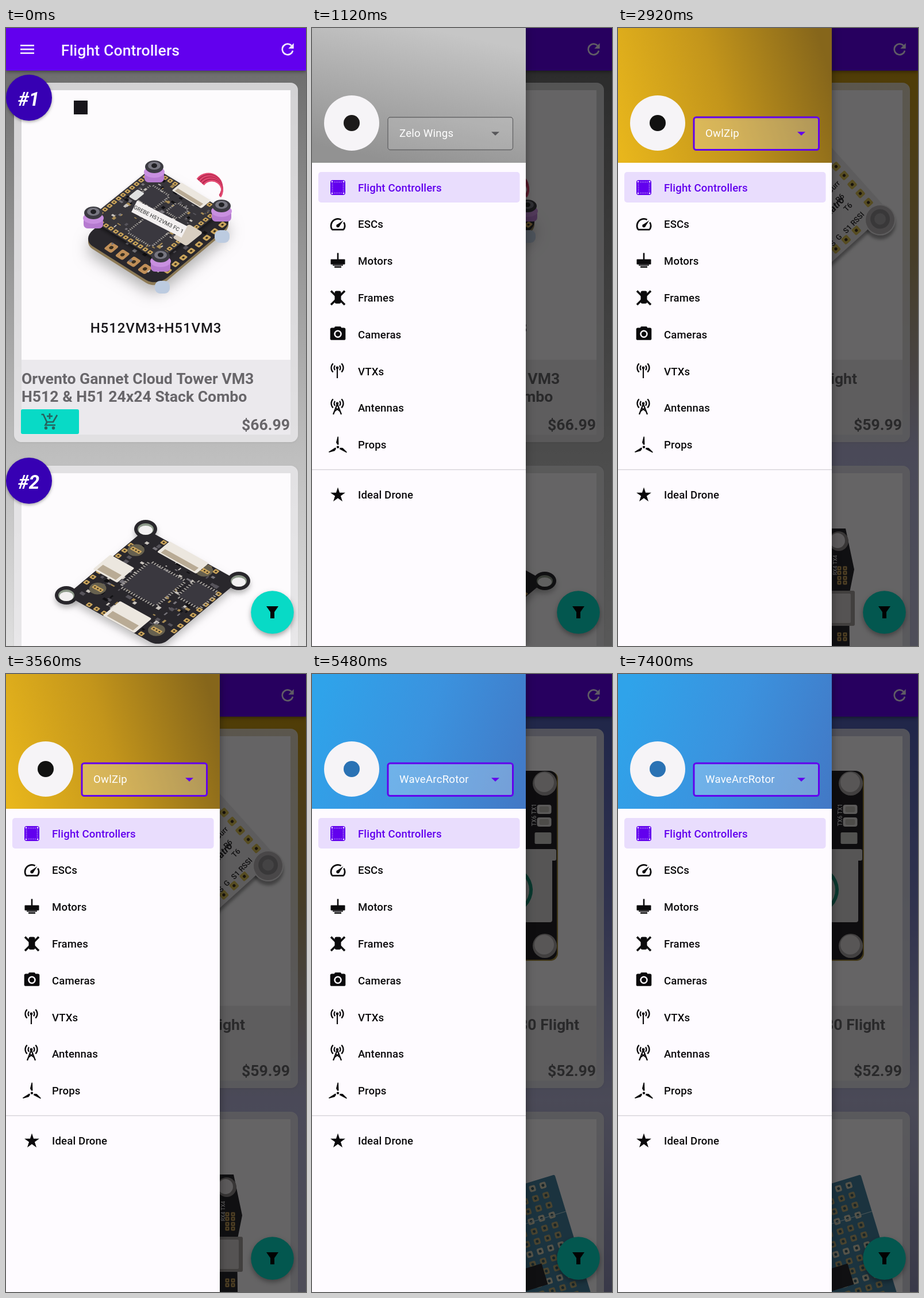
Recreate the animation shown at these times as an HTML page with a canvas. Size 522 by 1073 pixels, loop 7.6 s.

```html
<!DOCTYPE html>
<html lang="en">
<head>
<meta charset="utf-8">
<title>Flight Controllers</title>
<style>
html, body { margin: 0; width: 100%; height: 100%; overflow: hidden; background: #fff; }
canvas { display: block; width: 522px; height: 1073px; }
</style>
</head>
<body>
<canvas id="stage" width="522" height="1073"></canvas>
<script>
const W = 522, H = 1073, LOOP = 7600, DRAWER = 372;
const PURPLE = '#6200ee', TEAL = '#08dac6', PAPER = '#fefbff', GOLD = '#c9a45c', INK = '#0b0a0c', BOARD = '#29272c';
const FACE = 'Roboto, "Noto Sans", sans-serif';
const stage = document.getElementById('stage').getContext('2d');
let g = stage;

const SHOPS = [
  { name: 'Zelo Wings', mark: '#1c1a1a', price: '$66.99',
    header: ['#c6c6c6', '#ababab', '#929292'], from: [200, 0], to: [150, 234],
    page: ['#6e6e6e', '#979797', '#bebebe', '#dedede'] },
  { name: 'OwlZip', mark: '#111', price: '$59.99', title: 'Orvento Heron H7 Mini Flight', end: 416,
    header: ['#e8b61c', '#c3951b', '#86661b'], from: [0, 200], to: [372, 90],
    page: ['#c9980f', '#b09a66', '#b9b8de', '#c4c3e0'] },
  { name: 'WaveArcRotor', mark: '#2a72b4', price: '$52.99', title: 'Kestova Linnet H722 30x30 Flight', end: 465,
    header: ['#2fa3ea', '#3b92de', '#4279c6'], from: [0, 80], to: [372, 200],
    page: ['#5160b8', '#7a80c4', '#bab9da', '#8f8fb6'] }
];

const clamp = v => Math.max(0, Math.min(1, v));
const ease = (t, from, to) => { const k = clamp((t - from) / (to - from)); return k * k * (3 - 2 * k); };
function times(n, fn) { for (let i = 0; i < n; i++) fn(i); }
function seeded(seed) {
  return () => (seed = seed * 16807 % 2147483647) / 2147483647;
}

// ---- drawing helpers ----
function rect(x, y, w, h, color, r = 0) {
  g.fillStyle = color;
  g.beginPath();
  g.roundRect(x, y, w, h, r);
  g.fill();
}
const box = (x, y, w, h, color, r) => rect(x - w / 2, y - h / 2, w, h, color, r);
function disc(x, y, r, color, ry = r) {
  g.fillStyle = color;
  g.beginPath();
  g.ellipse(x, y, r, ry, 0, 0, 7);
  g.fill();
}
function poly(color, ...p) {
  g.fillStyle = color;
  g.beginPath();
  for (let i = 0; i < p.length; i += 2) g.lineTo(p[i], p[i + 1]);
  g.fill();
}
function line(color, width, ...p) {
  g.strokeStyle = color;
  g.lineWidth = width;
  g.beginPath();
  for (let i = 0; i < p.length; i += 2) g.lineTo(p[i], p[i + 1]);
  g.stroke();
}
function arc(x, y, r, a, b, color, width) {
  g.strokeStyle = color;
  g.lineWidth = width;
  g.beginPath();
  g.arc(x, y, r, a, b);
  g.stroke();
}
function text(s, x, y, font, color, align = 'left', spacing = 0) {
  g.font = `${font} ${FACE}`;
  g.fillStyle = color;
  g.textAlign = align;
  g.letterSpacing = spacing + 'px';
  g.fillText(s, x, y);
}
function at(x, y, deg, draw) {
  g.save();
  g.translate(x, y);
  g.rotate(deg * Math.PI / 180);
  draw();
  g.restore();
}
// A tilted square: 100 units along each of the edges u and v.
function plane([x, y], [ux, uy], [vx, vy], draw) {
  g.save();
  g.transform(ux / 100, uy / 100, vx / 100, vy / 100, x, y);
  draw();
  g.restore();
}
function shadow(blur, dy, alpha, draw) {
  g.save();
  g.shadowColor = `rgba(0,0,0,${alpha})`;
  g.shadowBlur = blur;
  g.shadowOffsetY = dy;
  draw();
  g.restore();
}
function gradient([x0, y0], [x1, y1], colors) {
  const f = g.createLinearGradient(x0, y0, x1, y1);
  colors.forEach((c, i) => f.addColorStop(i / (colors.length - 1), c));
  return f;
}

// ---- product photos ----
function pads(x, y, dx, dy, n, size, color = GOLD) {
  times(n, i => {
    box(x + dx * i, y + dy * i, size, size, color, size / 5);
    disc(x + dx * i, y + dy * i, size / 5, '#3b3020');
  });
}
function mcu(x, y, size) {
  const n = Math.round(size / 2.6);
  times(n, i => {
    const d = (i + .5) / n * size - size / 2;
    box(x + d, y, 1.1, size + 5, '#a8a49f');
    box(x, y + d, size + 5, 1.1, '#a8a49f');
  });
  box(x, y, size, size, '#3a383f', 1);
}
function specks(n, seed) {
  const rnd = seeded(seed), tones = ['#77747a', '#57545b', '#c9c4be', '#a88c55', '#121114'];
  times(n, () => box(8 + rnd() * 84, 8 + rnd() * 84, 1 + rnd() * 4, 1 + rnd() * 3, tones[Math.floor(rnd() * 5)]));
}
function socket(x, y, w, h) {
  box(x, y, w, h, '#ece7df', 1.5);
  box(x, y - h / 4, w - 6, h / 3, '#b9ab95');
}
function standoff(x, y) {
  box(x, y + 8, 34, 20, '#b67bd0', 7);
  disc(x, y, 18, '#c990e0', 10);
  disc(x, y - 9, 16, '#3c3b42', 11);
  disc(x, y - 11, 11, '#777680', 7);
  disc(x, y - 11, 5, '#202024', 4);
}
function stackPhoto() {
  rect(118, 126, 24, 24, '#17151a');
  plane([132, 372], [130, 82], [136, -114], () => {
    shadow(26, 12, .3, () => rect(0, 0, 100, 100, '#8d7a55', 14));
  });
  plane([132, 367], [130, 82], [136, -114], () => {
    rect(0, 0, 100, 100, BOARD, 14);
    pads(30, 9, 15, 0, 4, 10, '#c08f58');
    pads(94, 20, 0, 10, 8, 6);
    specks(50, 5);
  });
  [[376, 362], [272, 450]].forEach(([x, y]) => box(x, y, 26, 22, '#bccbe0', 9));
  times(7, i => arc(352 + i, 277 + i, 24 - i, -2.5, .6, i % 2 ? '#b82850' : '#e34a72', 3));
  plane([144, 331], [122, 74], [112, -90], () => {
    shadow(6, 4, .5, () => rect(0, 0, 100, 100, '#37353a', 8));
    specks(150, 11);
    [4, 96].forEach(d => {
      pads(14, d, 7, 0, 11, 5);
      pads(d, 14, 0, 7, 11, 5);
    });
    mcu(62, 28, 32);
    mcu(30, 66, 24);
    mcu(64, 68, 15);
    socket(60, 94, 42, 15);
    box(97, 48, 20, 26, '#d8cec1', 3);
    box(15, 58, 10, 14, '#dfe0e0', 2);
  });
  at(265, 331, 27, () => {
    box(2, 0, 98, 22, '#f3f0f0');
    text('GREBE H512VM3 FC 1', 1, 4, '500 9.5px', '#555', 'center');
  });
  [[258, 250], [152, 330], [375, 318], [269, 405]].forEach(p => standoff(...p));
  text('H512VM3+H51VM3', 261, 529, '500 24px', '#19171b', 'center', .9);
}
function boardPhoto() {
  const ears = [[243, 870], [105, 985], [405, 960]];
  ears.forEach(([x, y]) => shadow(8, 6, .25, () => disc(x, y, 20, BOARD, 16)));
  plane([105, 985], [162, 90], [138, -115], () => {
    shadow(14, 8, .25, () => rect(0, 0, 100, 100, BOARD, 10));
    specks(130, 23);
    [3, 97].forEach(d => {
      pads(22, d, 8, 0, 8, 4.5);
      pads(d, 22, 0, 8, 8, 4.5);
    });
    [[10, 76], [15, 22], [70, 92], [85, 14]].forEach(([x, y]) => { disc(x, y, 7, '#67614f'); pads(x - 3, y, 3, 0, 3, 4); });
    mcu(47, 54, 36);
    mcu(84, 67, 22);
    socket(46, 93, 42, 16);
    socket(10, 48, 26, 22);
    socket(56, 11, 34, 22);
  });
  ears.forEach(([x, y]) => { disc(x, y, 14, '#8e9a8b', 10); disc(x, y + 2, 12, '#f2f0f1', 8); });
}
function paleBoardPhoto() {
  at(456, 333, 48, () => {
    const edge = color => { rect(-200, -21, 198, 220, color, 18); disc(0, 0, 27, color); };
    shadow(5, 7, .35, () => edge('#eae7e9'));
    edge('#eae7e9');
    pads(-120, -5, 21, 0, 5, 13, '#d9be52');
    pads(-14, 43, 0, 24, 3, 13, '#d9be52');
    disc(0, 0, 25, '#b6b3b5');
    disc(-1, -1, 17, '#8f8c8f');
    disc(-1, -1, 10, '#aaa7aa');
    const label = (s, x, y, font = '500 13px') => at(x, y, -94, () => text(s, 0, 0, font, '#29272a'));
    label('Velatro', -62, 76, '700 italic 17px');
    ['G', 'Curr', 'R6', 'T6'].forEach((s, i) => label(s, -112 + 21 * i, 34));
    label('S1 RSSI', -21, 60);
    label('S  G', -20, 92);
  });
}
function usbBoardPhoto() {
  poly(BOARD, 340, 869, 396, 869, 411, 940, 402, 985, 403, H, 340, H);
  disc(384, 891, 17, '#8d8787');
  disc(382, 890, 13, '#e6e2e5');
  [938, 955, 1053].forEach(y => [385, 395].forEach(x => pads(x, y, 0, 8, 2, 7)));
  at(381, 950, -90, () => text('RX4 TX4', 0, 0, '500 9px', '#ddd'));
  rect(340, 977, 72, 61, '#a39d9c', 3);
  rect(340, 982, 65, 51, '#d5d0d0', 2);
}
function cardSlotPhoto() {
  rect(310, 169, 118, 329, '#a28a3a', 13);
  rect(310, 168, 116, 328, '#232126', 13);
  [190, 472].forEach(y => { disc(405, y, 21, '#a5a1a0'); disc(404, y - 2, 17, '#dcd8d9'); });
  [235, 257].forEach(y => { box(404, y, 25, 16, '#e4e1e0', 4); box(404, y, 17, 10, '#c1beb8', 3); });
  box(402, 285, 29, 20, '#cfcdca', 2);
  at(390, 264, -90, () => text('TX6 TX1', 0, 0, '500 10px', '#ddd'));
  rect(350, 304, 75, 20, '#d9d5d5', 3);
  rect(350, 304, 68, 127, '#d9d5d5', 4);
  arc(343, 375, 38, -1.2, 1.2, '#168d74', 6);
}
function blueBoardPhoto() {
  at(406, 874, -17, () => {
    rect(-110, 0, 127, 260, '#44809d', 3);
    times(52, i => {
      const x = -8 - i % 4 * 19, row = i >> 2, y = 12 + row * 18;
      box(x, y, 11, 11, row % 3 ? '#b7a875' : '#d5d0b6', 3);
      disc(x, y, 2.5, '#365a66');
    });
    line('#bcd5da', 1, -80, 67, 17, 67);
    box(-70, 160, 40, 38, '#27272e');
  });
}
const PHOTOS = [[stackPhoto, boardPhoto], [paleBoardPhoto, usbBoardPhoto], [cardSlotPhoto, blueBoardPhoto]];

// ---- page under the drawer ----
function card(top, rank, photo) {
  shadow(3, 1, .12, () => rect(14, top, 494, 624, 'rgba(255,255,255,.62)', 13));
  rect(14, top, 494, 624, 'rgba(226,225,229,.45)', 13);
  rect(27, top + 13, 468, 598, '#ebe9ed');
  rect(27, top + 13, 468, 468, '#fdfbfd');
  g.save();
  g.beginPath();
  g.rect(27, top + 13, 468, 468);
  g.clip();
  photo();
  g.restore();
  shadow(5, 2, .35, () => disc(40, top + 26, 40, '#3700b3'));
  text('#' + rank, 39.5, top + 40, 'italic 700 33px', '#fff', 'center');
}
function cartIcon(color) {
  line(color, 2.7, 61.5, 671, 65, 671, 71, 684, 82, 684, 89, 672);
  line(color, 2.7, 71.5, 684, 68.5, 689.5, 86, 689.5);
  box(76, 674, 2.7, 10, color);
  box(76, 674, 10, 2.7, color);
  [69.5, 82.5].forEach(x => disc(x, 694.5, 2.7, color));
}
function refreshIcon(x, y, color) {
  arc(x, y, 9.3, .25, 5.5, color, 2.7);
  poly(color, x + 1.3, y - 1.3, x + 10.7, y - 1.3, x + 10.7, y - 10.7);
}
function drawPage(shop, photos) {
  rect(0, 0, W, H, gradient([0, 74], [0, H], shop.page));
  card(95, 1, photos[0]);
  const big = '700 26.6px', grey = '#68666a';
  if (shop.title) {
    text(shop.title, shop.end, 618, big, grey, 'right');
    text('Controller', 27, 649, big, grey);
  } else {
    text('Orvento Gannet Cloud Tower VM3', 27, 618, big, grey);
    text('H512 & H51 24x24 Stack Combo', 27, 649, big, grey);
  }
  rect(26, 662, 101, 43, TEAL, 3);
  cartIcon('#26645f');
  text(shop.price, 494, 698, big, grey, 'right');
  card(760, 2, photos[1]);
  shadow(6, 2, .4, () => rect(0, 0, W, 74, PURPLE));
  times(3, i => rect(25, 29 + 6.65 * i, 24, 2.7, '#f2eafd'));
  text('Flight Controllers', 95.7, 48, '500 26.6px', '#f7f2ff', 'left', .1);
  refreshIcon(490, 37, '#f2eafd');
  shadow(8, 4, .35, () => disc(463.5, 1014.5, 37.3, TEAL));
  poly('#050505', 453, 1004, 474, 1004, 467, 1014, 467, 1025, 460, 1025, 460, 1014);
}

// ---- drawer icons, centred on x = 45 ----
function chip(y) {
  box(45, y, 26, 26, PURPLE, 4);
  [-10, 10].forEach(dx => [-10, 10].forEach(dy => disc(45 + dx, y + dy, 1.4, '#e9ddfd')));
  times(5, i => [-9.5, 9.5].forEach(d => {
    box(45 + 3 * i - 6, y + d, 1.2, 2, '#b995f4');
    box(45 + d, y + 3 * i - 6, 2, 1.2, '#b995f4');
  }));
}
function gauge(y) {
  arc(45, y + 2.7, 12, 2.6, 5.2, INK, 2.7);
  arc(45, y + 2.7, 12, 5.75, 6.83, INK, 2.7);
  box(45, y + 9.3, 21, 2.7, INK);
  poly(INK, 43, y + 1, 54.4, y - 6.7, 47, y + 4.6);
  disc(45, y + 2.7, 2.7, INK);
}
function motor(y) {
  box(45, y - 8, 2.6, 12, INK);
  box(45, y + 1.5, 25, 9, INK, 1);
  box(45, y + 7, 18, 2, INK);
  box(45, y + 10.3, 12, 2.6, INK);
}
function frame(y) {
  line(INK, 3.6, 33, y - 12, 57, y + 12);
  line(INK, 3.6, 57, y - 12, 33, y + 12);
  box(45, y - 1, 11, 22, INK, 3);
}
function camera(y) {
  box(45, y - 1, 26.6, 21.3, INK, 2.7);
  box(45, y - 10, 12, 8, INK, 2);
  disc(45, y - 1, 6.7, PAPER);
  disc(45, y - 1, 4.2, INK);
}
function waves(y) {
  [5.5, 10.5].forEach(r => [0, Math.PI].forEach(a => arc(44, y, r, a - .8, a + .8, INK, 2.3)));
  disc(44, y, 2.4, INK);
}
function antenna(y) {
  waves(y - 6);
  box(44, y + 3, 2.2, 18, INK);
}
function tower(y) {
  waves(y - 8);
  line(INK, 2.3, 37, y + 11, 44, y - 7, 51, y + 11);
  line(INK, 1.8, 41, y, 49, y + 6);
  line(INK, 1.8, 47, y, 39, y + 6);
}
function prop(y) {
  times(3, i => at(45, y + 4, i * 120, () => poly(INK, -1, -4, -3, -8, -.5, -18, 1, -18, 1.5, -4)));
  disc(45, y + 4, 2.2, INK);
}
function star(y) {
  const p = [];
  times(10, i => {
    const r = i % 2 ? 5.2 : 13.6, a = i * Math.PI / 5;
    p.push(45 + r * Math.sin(a), y + 1 - r * Math.cos(a));
  });
  poly(INK, ...p);
}
const MENU = {
  'Flight Controllers': chip, ESCs: gauge, Motors: motor, Frames: frame, Cameras: camera,
  VTXs: antenna, Antennas: tower, Props: prop, 'Ideal Drone': star
};

// ---- drawer ----
function header(shop, alpha) {
  g.globalAlpha = alpha;
  rect(0, 0, DRAWER, 234, gradient(shop.from, shop.to, shop.header));
  disc(69, 165, 48, '#f6f4f7');
  disc(69, 165, 14, shop.mark);
  g.globalAlpha = 1;
}
function blend(step, draw) {
  const i = Math.floor(step);
  draw(i, 1);
  if (step > i) draw(i + 1, step - i);
}
function selector(s) {
  rect(131, 154, 219.5, 58, `rgba(255,255,255,${s.label ? .27 : .13})`, 4);
  g.strokeStyle = s.focus ? PURPLE : '#646466';
  g.lineWidth = s.focus ? 3 : 1.4;
  g.beginPath();
  g.roundRect(132, 155, 217.5, 56.5, 4);
  g.stroke();
  text(SHOPS[s.label].name, 152, 188.5, '400 18.6px', s.up ? 'rgba(255,255,255,.82)' : '#fff', 'left', .25);
  const d = s.up ? -3.3 : 3.3;
  poly(s.focus ? PURPLE : '#57575a', 312, 183.5 - d, 326, 183.5 - d, 319, 183.5 + d);
}
function popup(s) {
  if (!s.open) return;
  g.save();
  g.globalAlpha = s.open;
  const h = s.up ? 189 * (.4 + .6 * s.open) : 189;
  shadow(9, 4, .32, () => rect(131, 213, 220, h, PAPER, 4));
  g.beginPath();
  g.rect(131, 213, 220, h);
  g.clip();
  if (s.pressed) rect(131, 225 + 55.6 * s.pressed, 220, 55.6, 'rgba(0,0,0,.1)');
  SHOPS.forEach((shop, i) => text(shop.name, 144, 260.5 + 55.6 * i, '700 21.3px', INK));
  g.restore();
}
function drawer(s) {
  g.save();
  g.translate(DRAWER * (s.slide - 1), 0);
  shadow(14, 0, .4, () => rect(0, 0, DRAWER, H, PAPER));
  blend(s.header, (i, a) => header(SHOPS[i], a));
  selector(s);
  rect(11, 250, 350.5, 53, '#e9ddfd', 5);
  Object.entries(MENU).forEach(([name, draw], i) => {
    const y = i < 8 ? 277 + 63.8 * i : 810;
    draw(y);
    text(name, 80, y + 6.6, '500 18.6px', i ? INK : PURPLE, 'left', .15);
  });
  rect(0, 766, DRAWER, 1.4, '#d9d6dc');
  popup(s);
  g.restore();
}

// ---- timeline ----
function stateAt(t) {
  const picks = [[1680, 2480], [4080, 4920]];
  const s = { slide: 1 - (1 - clamp((t - 539) / 600)) ** 5, focus: t >= 1680, up: false, open: 0, label: 0, header: 0, page: 0, pressed: 0 };
  picks.forEach(([tap, pick], i) => {
    s.open += ease(t, tap + 60, tap + 260) * (1 - ease(t, pick + 80, pick + 240));
    s.up ||= t >= tap && t < pick + 80;
    s.label += t >= pick + 80;
    s.header += ease(t, pick + 120, pick + 320);
    s.page += ease(t, pick + 200, pick + 420);
    if (t >= pick && t < pick + 240) s.pressed = i + 1;
  });
  return s;
}

const pages = SHOPS.map((shop, i) => {
  const c = document.createElement('canvas');
  c.width = W;
  c.height = H;
  g = c.getContext('2d');
  drawPage(shop, PHOTOS[i]);
  return c;
});
g = stage;

const start = performance.now();
function tick(now) {
  const s = stateAt(Math.max(0, now - start) % LOOP);
  blend(s.page, (i, a) => {
    g.globalAlpha = a;
    g.drawImage(pages[i], 0, 0);
  });
  g.globalAlpha = 1;
  if (s.slide > 0) {
    rect(0, 0, W, H, `rgba(0,0,0,${.6 * s.slide})`);
    drawer(s);
  }
  requestAnimationFrame(tick);
}
tick(start);
</script>
</body>
</html>
```
